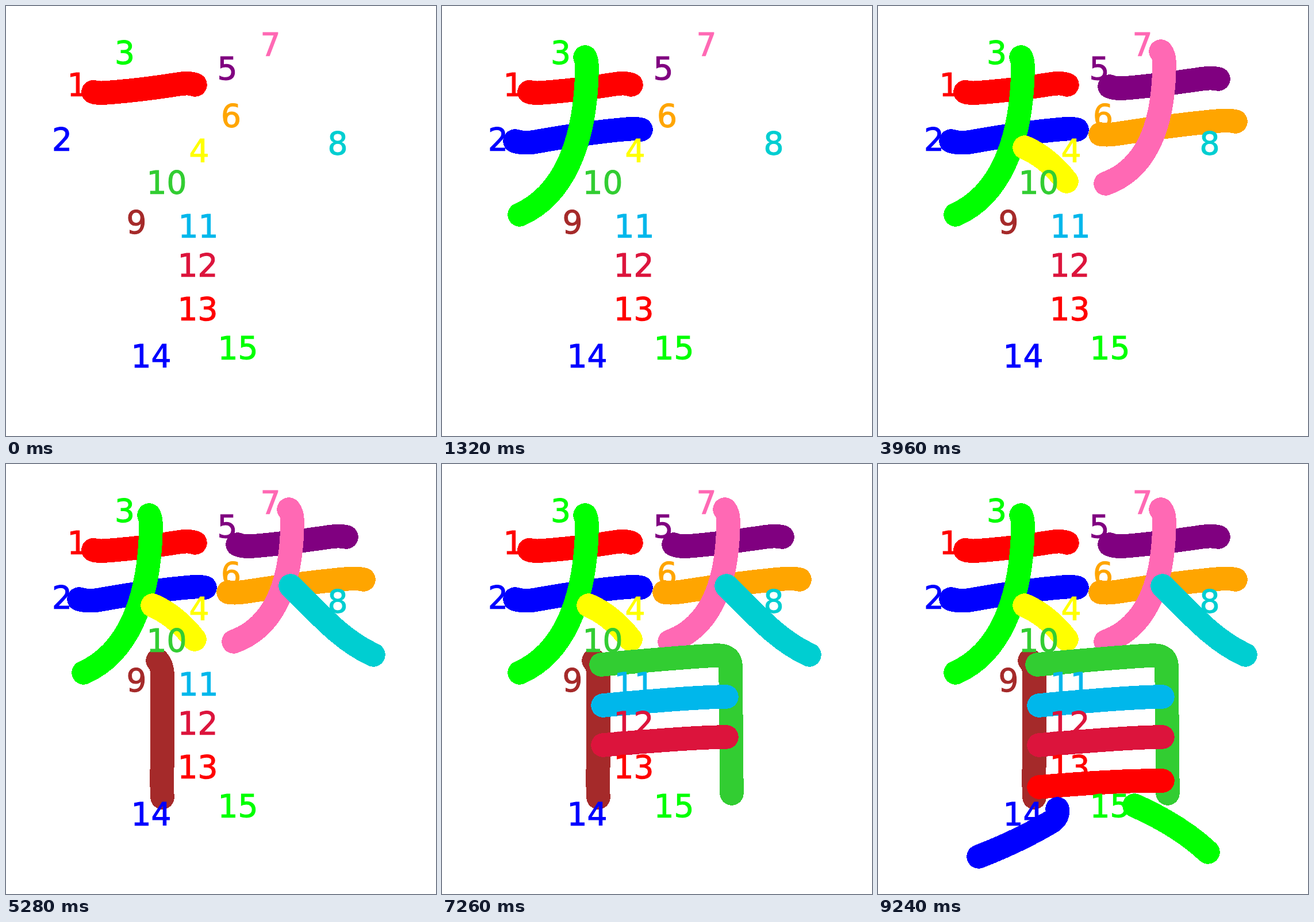
Animation of 748x748 px, one loop 9900 ms. Source, as an HTML page:

```html
<!DOCTYPE html>
<html lang="en">
<head>
<meta charset="utf-8">
<title>Stroke order</title>
<style>
  html, body { margin: 0; width: 100%; height: 100%; overflow: hidden; background: #fff; }
  svg { display: block; width: 100%; height: 100%; }
  path { fill: none; stroke-width: 41.5; stroke-linecap: round; stroke-linejoin: round; shape-rendering: crispEdges; }
  text { font: 55px "DejaVu Sans", Verdana, sans-serif; stroke-width: 1.1; }
</style>
</head>
<body>
<svg viewBox="0 0 748 748"><g id="strokes"></g><g id="labels"></g></svg>
<script>
const STEP = 660;

// colour, label x, label baseline, stroke path
const strokes = [
  ['#f00', 106.5, 155.5, 'M152 149.5Q160 152 172 151Q230 147 300 136Q318 133 329 137'],
  ['#00f', 80, 250.5, 'M127 235Q140 239 158 237Q260 219 324 214Q338 213 346 215'],
  ['#0f0', 189, 99.5, 'M249 89Q253 98 252 115C249 240 210 330 135 363'],
  ['#ff0', 318.5, 270.5, 'M255 246Q295 263 328 305'],
  ['#800080', 367.5, 127.5, 'M403 140Q412 144 428 143Q470 140 555 128Q578 124 592 127'],
  ['#ffa500', 374, 209.5, 'M387 223Q400 225 418 222Q500 209 580 201Q610 198 622 201'],
  ['#ff69b4', 442.5, 85.5, 'M492 79Q498 86 498 97C498 205 468 283 396 309'],
  ['#00ced1', 559.5, 257.5, 'M495 212C540 255 580 305 639 332'],
  ['#a52a2a', 209.5, 394.5, 'M264 342Q271 350 272 364V525L271 535V555L272 580'],
  ['#32cd32', 244.5, 325.5, 'M277 349Q440 334 480 333Q502 333 502 352L504 573'],
  ['#00b7eb', 299.5, 401.5, 'M280 420Q440 405 495 405'],
  ['#dc143c', 298.5, 469.5, 'M280 489Q440 475 495 475'],
  ['#f00', 298.5, 545.5, 'M280 562Q420 550 495 551'],
  ['#00f', 217.5, 627.5, 'M312 600Q314 613 302 622Q245 656 175 683'],
  ['#0f0', 368.5, 613.5, 'M446 594Q525 629 574 675']
];

function add(parent, tag, attrs) {
  const el = document.createElementNS('http://www.w3.org/2000/svg', tag);
  for (const key in attrs) el.setAttribute(key, attrs[key]);
  return document.getElementById(parent).appendChild(el);
}

const paths = strokes.map(([color, x, y, d], i) => {
  add('labels', 'text', { x, y, fill: color, stroke: color }).textContent = i + 1;
  return add('strokes', 'path', { d, stroke: color });
});

const start = performance.now();

function draw() {
  const elapsed = Math.max(0, performance.now() - start);
  const current = Math.floor(elapsed / STEP) % strokes.length;
  paths.forEach((path, i) => {
    path.style.visibility = i <= current ? 'visible' : 'hidden';
  });
  requestAnimationFrame(draw);
}
draw();
</script>
</body>
</html>
```
